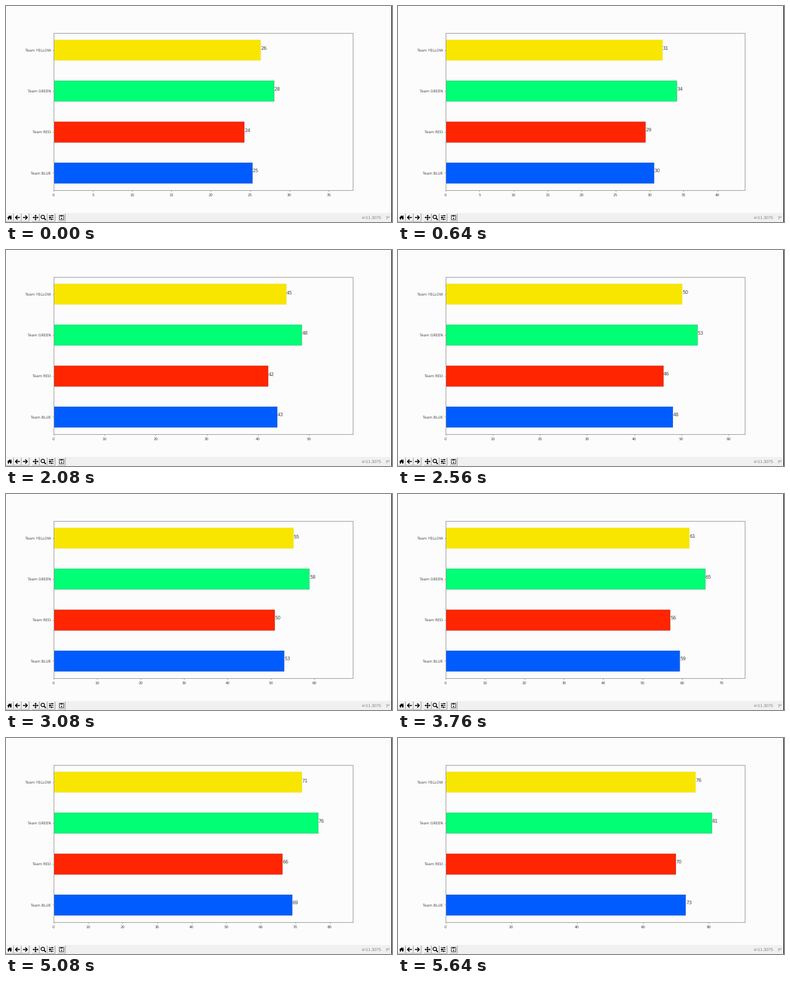
Animation, 640 px wide and 360 px high, one loop 5800 ms. Source, as a matplotlib script:

```python
import numpy as np
import matplotlib.pyplot as plt
from matplotlib.animation import FuncAnimation
from matplotlib.patches import Circle, Polygon, Rectangle
from matplotlib.ticker import FormatStrFormatter, MaxNLocator

W, H, DPI = 640, 360, 80
PX = 72 / DPI
TICK_MS, TICKS = 40, 145
STEPS = 150
PAPER, INK, LINE = "#fcfcfc", "#484848", "#9c9c9c"

TEAMS = ["Team BLUE", "Team RED", "Team GREEN", "Team YELLOW"]
SCORES = np.array([73, 70, 81, 76])
COLORS = ["#005cff", "#ff2500", "#00ff74", "#f8e600"]
EDGES = ["#0048c0", "#b81c00", "#30b070", "#f0e040"]

# pace of the race: tick -> step, including the short stalls
PACE = np.array([
    (0, 52), (1, 52), (32, 74), (33, 75), (52, 90), (53, 90), (77, 109),
    (78, 110), (94, 122), (95, 123), (106, 131), (107, 131), (108, 132),
    (113, 135), (115, 135), (116, 136), (137, 147), (138, 147), (141, 150),
])

plt.rcParams.update({
    "font.family": "DejaVu Sans",
    "text.hinting": "none",
    "text.hinting_factor": 1,
})
fig = plt.figure(figsize=(W / DPI, H / DPI), dpi=DPI, facecolor=PAPER)

# window chrome, in pixels from the top left
ui = fig.add_axes([0, 0, 1, 1])
ui.set(xlim=(0, W), ylim=(H, 0))
ui.axis("off")


def box(x, y, w, h, color, **kw):
    ui.add_patch(Rectangle((x, y), w, h, fc=color, lw=0, **kw))


def shape(*pts, color="black"):
    ui.add_patch(Polygon(pts, fc=color, lw=0))


def stroke(xs, ys, color="black", width=1.0):
    ui.plot(xs, ys, color=color, lw=width * PX, solid_capstyle="butt",
            snap=False)


def button(cx):
    box(cx - 6, 346, 12, 13, "#f6f6f6")
    stroke([cx + 6.2] * 2, [346, 359], "#8c8c8c", 0.9)
    stroke([cx - 6, cx + 6.2], [358.8, 358.8], "#a0a0a0", 0.8)


def arrow(cx, cy, d):
    stroke([cx - 3.8 * d, cx + 4 * d], [cy, cy], width=1.6)
    stroke([cx, cx - 3.2 * d, cx], [cy - 3.4, cy, cy + 3.4], width=1.6)


def toolbar():
    box(0, 345, W, 15, "#f0f0f0")
    for cx in (6, 19, 32, 49, 62, 75, 92):
        button(cx)
    cy = 352.5

    # home
    shape((1.8, cy + 0.6), (6, cy - 3.6), (10.2, cy + 0.6))
    box(3, cy, 2.3, 3.6, "black")
    box(6.7, cy, 2.3, 3.6, "black")
    box(5, cy, 2, 1.2, "black")
    box(8, cy - 3.4, 1.1, 2.4, "black")

    arrow(19, cy, 1)
    arrow(32, cy, -1)

    # pan
    stroke([45, 53], [cy, cy], width=1.3)
    stroke([49, 49], [cy - 4, cy + 4], width=1.3)
    for dx, dy in ((1, 0), (-1, 0), (0, 1), (0, -1)):
        bx, by = 49 + 2.8 * dx, cy + 2.8 * dy
        shape((49 + 4.8 * dx, cy + 4.8 * dy),
              (bx + 1.9 * dy, by + 1.9 * dx), (bx - 1.9 * dy, by - 1.9 * dx))

    # zoom
    ui.add_patch(Circle((61, cy - 0.9), 2.9, fc="none", ec="black",
                        lw=1.3 * PX))
    stroke([63, 66], [cy + 1.1, cy + 4.1], width=1.8)

    # sliders
    for dy, knob in ((-3, 76.5), (0, 73), (3, 75.5)):
        stroke([71, 79], [cy + dy, cy + dy], width=0.9)
        box(knob - 0.8, cy + dy - 1.2, 1.6, 2.4, "black")

    # save
    ui.add_patch(Rectangle((88.4, cy - 3.7), 7.4, 7.4, fc="#f6f6f6",
                           ec="#303030", lw=1.0 * PX, snap=False))
    box(90, cy - 3.4, 4, 2.3, "#404040")
    ui.add_patch(Circle((92.1, cy + 1.4), 1.2, fc="#404040", lw=0))

    for x, s in ((590, "x=11.3075"), (629.6, "y=")):
        ui.text(x, 354.7, s, fontsize=6.5 * PX, color="#808080",
                family="Liberation Sans")


toolbar()
box(639, 0, 1, H, "black")

# chart
L, R, T, B = 78.8, 575, 44.6, 307.4
ax = fig.add_axes([L / W, 1 - B / H, (R - L) / W, (B - T) / H],
                  facecolor=PAPER)
bars = ax.barh(range(4), SCORES, height=0.5, color=COLORS,
               edgecolor=EDGES, linewidth=0.6 * PX, snap=False)
labels = [ax.text(0, i, "", fontsize=8.4 * PX, color=INK) for i in range(4)]
ax.set_ylim(-0.425, 3.425)
ax.set_yticks(range(4), TEAMS)
ax.xaxis.set_major_locator(MaxNLocator(9, steps=[1, 2, 2.5, 5, 10]))
ax.xaxis.set_major_formatter(FormatStrFormatter("%d"))
ax.tick_params(labelsize=6.2 * PX, labelcolor=INK, color=LINE,
               length=2.1 * PX, width=PX, pad=2.2 * PX)
ax.tick_params(axis="x", pad=3.2 * PX)
for spine in ax.spines.values():
    spine.set(linewidth=PX, edgecolor=LINE)


def update(tick):
    step = round(float(np.interp(tick, *PACE.T)))
    values = SCORES * step / STEPS
    for bar, label, v in zip(bars, labels, values):
        bar.set_width(v)
        label.set_x(v)
        label.set_text(str(int(v)))
    ax.set_xlim(0, values.max() + 10)
    return [*bars, *labels]


anim = FuncAnimation(fig, update, frames=TICKS, interval=TICK_MS,
                     repeat=True, repeat_delay=0, blit=False)
plt.show()
```
